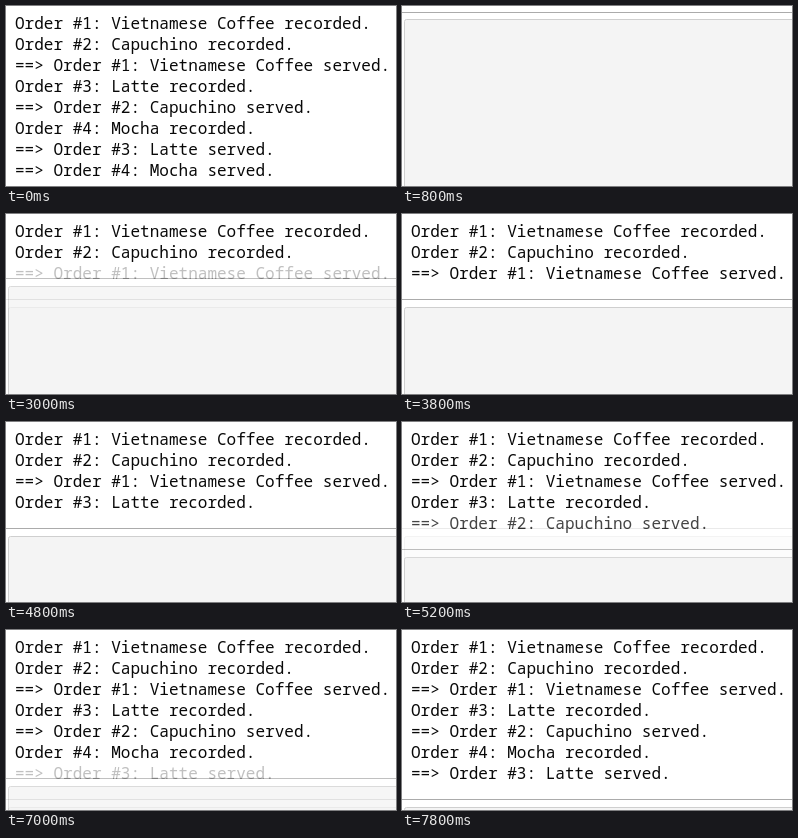
These frames come from a looping animation (390 px wide and 180 px high, 8 s). An HTML page:

```html
<!DOCTYPE html>
<html lang="en">
<head>
<meta charset="utf-8">
<title>Coffee orders</title>
<style>
  html, body { margin: 0; width: 100%; height: 100%; overflow: hidden; background: #fff; }
  svg { display: block; width: 390px; height: 180px; }
  text { font: 16.04px "Noto Sans Mono", "DejaVu Sans Mono", monospace; fill: #080808; }
  .page { fill: #fff; }
  .rule { fill: #ababab; }
  .cell { fill: #f4f4f4; stroke: #cfcfcf; }
</style>
</head>
<body>
<svg id="stage" viewBox="0 0 390 180"></svg>
<script>
const LOOP = 8000, STEP = 100, FADE_STEPS = 4, PITCH = 21;
const lines = [
  'Order #1: Vietnamese Coffee recorded.',
  'Order #2: Capuchino recorded.',
  '==> Order #1: Vietnamese Coffee served.',
  'Order #3: Latte recorded.',
  '==> Order #2: Capuchino served.',
  'Order #4: Mocha recorded.',
  '==> Order #3: Latte served.',
  '==> Order #4: Mocha served.'
];
const cues = [
  { at: 0, count: 8 },
  { at: 800, count: 0 },
  { at: 1000, count: 2, fade: true },
  { at: 3000, count: 3, fade: true },
  { at: 4000, count: 4, fade: true },
  { at: 5000, count: 5, fade: true },
  { at: 5800, count: 6 },
  { at: 7000, count: 7, fade: true }
];
const stage = document.getElementById('stage');

function add(parent, tag, attrs) {
  const el = document.createElementNS('http://www.w3.org/2000/svg', tag);
  for (const key in attrs) el.setAttribute(key, attrs[key]);
  return parent.appendChild(el);
}

// One opaque view of the notebook with a settable number of output lines
function makeView() {
  const root = add(stage, 'g');
  add(root, 'rect', { class: 'page', width: 390, height: 180 });
  const rows = lines.map((line, i) => {
    const row = add(root, 'text', { x: 9, y: 23 + PITCH * i });
    row.textContent = line;
    return row;
  });
  const rule = add(root, 'rect', { class: 'rule', width: 390, height: 1 });
  const cell = add(root, 'rect', { class: 'cell', x: 2.5, width: 420, height: 240, rx: 2 });

  return function show(count, opacity) {
    const ruleY = count ? 22 + PITCH * count : 6;
    rows.forEach((row, i) => row.setAttribute('display', i < count ? 'inline' : 'none'));
    rule.setAttribute('y', ruleY);
    cell.setAttribute('y', ruleY + (count ? 8.5 : 7.5));
    root.setAttribute('opacity', opacity);
  };
}

const showBefore = makeView();
const showNow = makeView();

function render(time) {
  const t = time % LOOP;
  const i = cues.findLastIndex(cue => cue.at <= t);
  const cue = cues[i];
  const before = cues[Math.max(i - 1, 0)];
  const step = Math.floor((t - cue.at) / STEP) + 1;
  showBefore(before.count, 1);
  showNow(cue.count, cue.fade ? Math.min(step / FADE_STEPS, 1) : 1);
}

const start = performance.now();
function tick() {
  render(performance.now() - start);
  requestAnimationFrame(tick);
}
tick();
</script>
</body>
</html>
```
